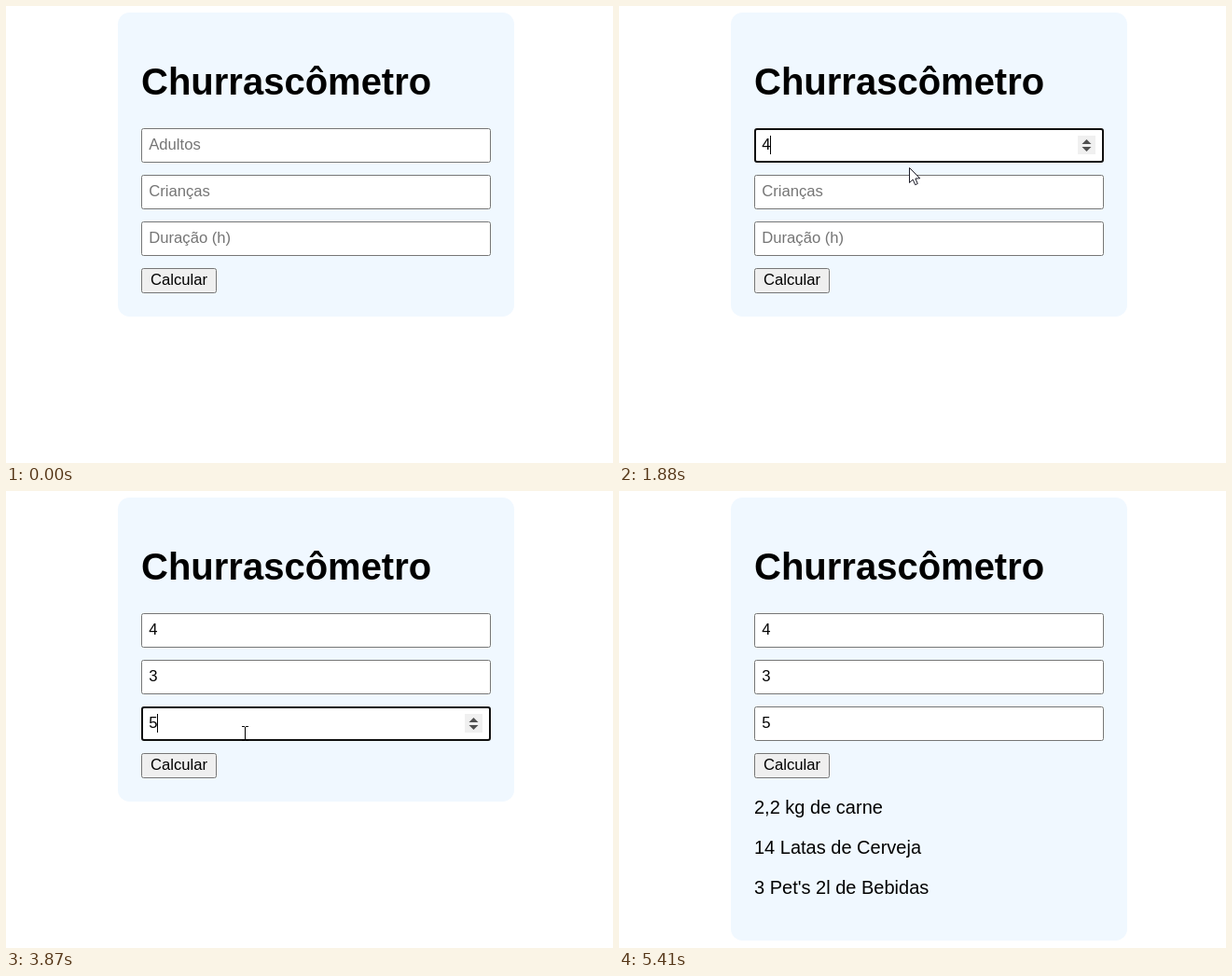
Write an HTML page with a canvas that moves like this. It is 651x490 px and loops after 6.35 s.

```html
<!DOCTYPE html>
<html lang="pt-BR">
<head>
<meta charset="utf-8">
<title>Churrascômetro</title>
<style>
  html, body { margin: 0; width: 100%; height: 100%; overflow: hidden; background: #fff; }
  canvas { display: block; }
</style>
</head>
<body>
<canvas id="stage" width="651" height="490"></canvas>
<script>
const ctx = document.getElementById('stage').getContext('2d');
const LOOP = 6350, RESULT_AT = 4470, PRESS_AT = 4410;

const fields = [
  { y: 131, hint: 'Adultos', value: '4', focus: 870, release: 1000, typed: 1390, blur: 2390 },
  { y: 181, hint: 'Crianças', value: '3', focus: 2390, release: 2470, typed: 2660, blur: 3390 },
  { y: 231, hint: 'Duração (h)', value: '5', focus: 3390, release: 3530, typed: 3660, blur: PRESS_AT },
];
const results = ['2,2 kg de carne', '14 Latas de Cerveja', "3 Pet's 2l de Bebidas"];

// Pointer moves: first and last update, number of updates, end point
const moves = [
  [70, 70, 1, 606, 463],
  [140, 210, 2, 425, 232],
  [280, 350, 2, 332, 167],
  [620, 670, 2, 328, 158],
  [1730, 1880, 3, 311, 173],
  [1960, 2270, 5, 304, 200],
  [2860, 3270, 7, 284, 245],
  [3800, 4210, 7, 187, 296],
  [4650, 4860, 4, 198, 329],
  [5060, 5340, 5, 326, 445],
];
const POINTER_END = 5410;

function pointerAt(t) {
  if (t < moves[0][0] || t >= POINTER_END) return null;
  let x = moves[0][3], y = moves[0][4];
  for (const [start, end, count, toX, toY] of moves) {
    if (t < start) break;
    const gap = (end - start) / (count - 1 || 1) || 1;
    const p = Math.min(count, Math.floor((t - start) / gap + 0.01) + 1) / count;
    x += (toX - x) * p;
    y += (toY - y) * p;
  }
  return { x: Math.round(x), y: Math.round(y) };
}

const between = (t, a, b) => t >= a && t < b;
const inside = (p, x, y, w, h) => p && between(p.x, x, x + w) && between(p.y, y, y + h);

function box(x, y, w, h, r, fill, stroke, line = 1) {
  ctx.beginPath();
  ctx.roundRect(x, y, w, h, r);
  ctx.fillStyle = fill;
  ctx.fill();
  if (!stroke) return;
  ctx.strokeStyle = stroke;
  ctx.lineWidth = line;
  ctx.stroke();
}

function text(str, x, y, size, color = '#000', weight = '') {
  ctx.font = `${weight} ${size}px "Liberation Sans", Arial, sans-serif`;
  ctx.fillStyle = color;
  ctx.fillText(str, x, y);
}

function polygon(x, y, points, fill, stroke) {
  ctx.beginPath();
  for (let i = 0; i < points.length; i += 2) ctx.lineTo(x + points[i], y + points[i + 1]);
  ctx.closePath();
  ctx.fillStyle = fill;
  ctx.fill();
  if (!stroke) return;
  ctx.strokeStyle = stroke;
  ctx.lineWidth = 1;
  ctx.stroke();
}

function drawField(f, t, pointer) {
  const focused = between(t, f.focus, f.blur);
  const hovered = inside(pointer, 145, f.y, 375, 37);
  const filled = t >= f.typed;
  if (focused) box(146, f.y + 1, 373, 35, 2, '#fff', '#101010', 2);
  else box(145.5, f.y + 0.5, 374, 36, 2, '#fff', hovered ? '#4f4f4f' : '#767676');

  text(filled ? f.value : f.hint, 153.2, f.y + 23, 16.667, filled ? '#000' : '#757575');

  if (focused && (t - (filled ? f.typed : f.focus)) % 1000 < 500) {
    ctx.fillStyle = '#000';
    ctx.fillRect(filled ? 162 : 153, f.y + 8, 1, 20);
  }
  if (focused || hovered) {
    ctx.fillStyle = '#f0f0f0';
    ctx.fillRect(492, f.y + 8, 19, 20);
    polygon(501.5, f.y + 12, [0, 0, 5, 5, -5, 5], '#505050');
    polygon(501.5, f.y + 25, [0, 0, 5, -5, -5, -5], '#505050');
  }
}

function drawButton(t, pointer) {
  const pressed = between(t, PRESS_AT, RESULT_AT);
  const hovered = inside(pointer, 145, 281, 81, 27);
  const fill = pressed ? '#f5f5f5' : hovered ? '#e5e5e5' : '#efefef';
  const stroke = pressed ? '#8d8d8d' : hovered ? '#4f4f4f' : '#767676';
  box(145.5, 281.5, 80, 26, 2, fill, stroke);
  text('Calcular', 155, 299, 16.667);
}

function drawPointer(t, p) {
  const clicking = fields.some(f => between(t, f.focus, f.release)) || between(t, PRESS_AT, RESULT_AT);
  if (clicking) {
    ctx.fillStyle = 'rgba(255, 240, 0, 0.55)';
    ctx.beginPath();
    ctx.arc(p.x, p.y, 12, 0, 7);
    ctx.fill();
  }
  const overText = fields.some(f => inside(p, 145, f.y, 375, 37)) ||
    t >= RESULT_AT && results.some((line, i) => {
      ctx.font = '20px "Liberation Sans", Arial, sans-serif';
      return inside(p, 145, 328 + 43 * i, ctx.measureText(line).width, 23);
    });
  if (overText) {
    ctx.fillStyle = '#000';
    ctx.fillRect(p.x, p.y - 7, 1, 14);
    for (const y of [p.y - 8, p.y + 7]) {
      ctx.fillRect(p.x - 3, y, 3, 1);
      ctx.fillRect(p.x + 1, y, 3, 1);
    }
  } else {
    polygon(p.x + 0.5, p.y + 0.5, [0, 0, 0, 16, 3.7, 12.6, 6.2, 18.2, 8.8, 17, 6.4, 11.5, 11.3, 11.3],
      '#fff', '#1c1c28');
  }
}

function draw(t) {
  const pointer = pointerAt(t);
  const done = t >= RESULT_AT;
  ctx.fillStyle = '#fff';
  ctx.fillRect(0, 0, 651, 490);
  box(120, 7, 425, done ? 475 : 326, 12.5, '#f0f8ff');
  text('Churrascômetro', 145, 95, 40, '#000', 'bold');
  fields.forEach(f => drawField(f, t, pointer));
  drawButton(t, pointer);
  if (done) results.forEach((line, i) => text(line, 145, 346 + 43 * i, 20));
  if (pointer) drawPointer(t, pointer);
}

const begin = performance.now();
function tick() {
  draw((performance.now() - begin) % LOOP);
  requestAnimationFrame(tick);
}
tick();
</script>
</body>
</html>
```
